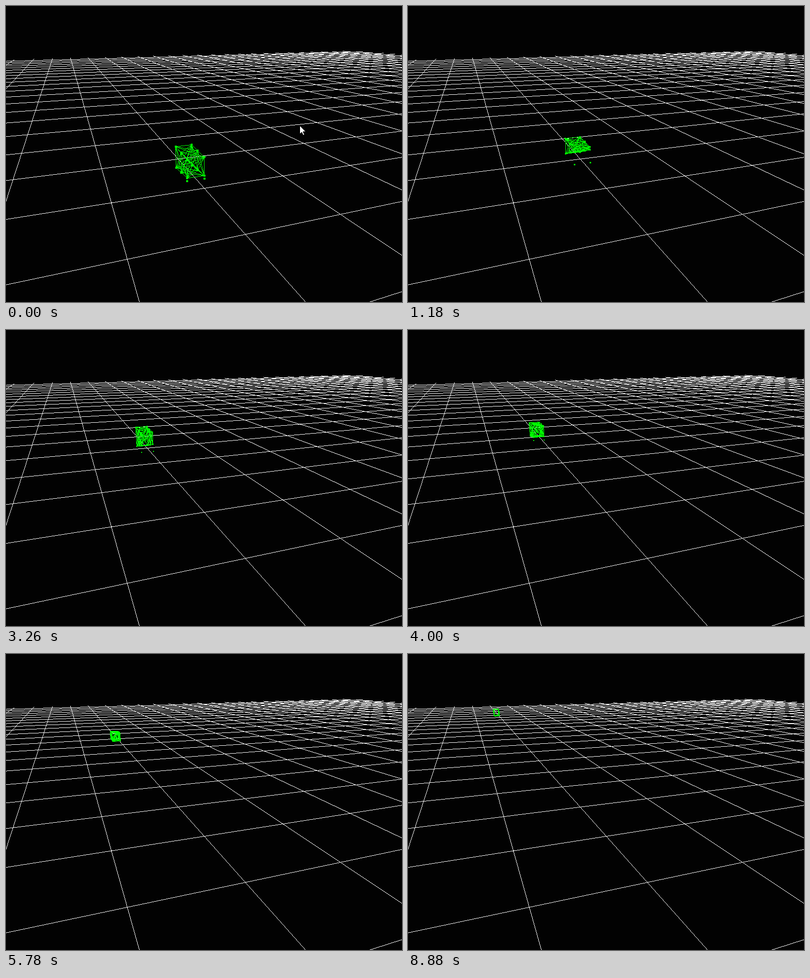
Animation, 800 px wide and 600 px high, one loop 8.9 s. Source, as an HTML page with a canvas:

```html
<!DOCTYPE html>
<html lang="en">
<head>
<meta charset="utf-8">
<title>Wire cube on a plane</title>
<style>
html, body { margin: 0; width: 100%; height: 100%; overflow: hidden; background: #020202; }
canvas { display: block; }
</style>
</head>
<body>
<canvas id="stage" width="800" height="600"></canvas>
<script>
const W = 800, H = 600, LOOP = 8900;
const ctx = document.getElementById('stage').getContext('2d');

// Camera: 45 degree lens above a plane with cells of size 1
const FOCAL = 300 / Math.tan(Math.PI / 8);
const EYE = 1.6622, NEAR = 0.2, EDGE = 22;
const pitch = Math.atan(254 / FOCAL), yaw = 20.47 * Math.PI / 180;
const sp = Math.sin(pitch), cp = Math.cos(pitch);
const sy = Math.sin(yaw), cy = Math.cos(yaw);

function toCamera(u, v, h) {
  const a = u - 0.7393, b = v + 1.3679;
  const right = cy * a - sy * b;
  const ahead = sy * a + cy * b;
  const drop = EYE - h;
  return [right, drop * cp - ahead * sp, ahead * cp + drop * sp];
}

// Whole numbers are pixel centres
function toScreen([x, y, z]) {
  return [399.5 + FOCAL * x / z, 299.5 + FOCAL * y / z];
}

const project = (u, v, h = 0) => toScreen(toCamera(u, v, h));

// One pixel wide line without smoothing
function line(g, p, q) {
  let [x0, y0] = p, [x1, y1] = q;
  const steep = Math.abs(y1 - y0) > Math.abs(x1 - x0);
  if (steep) [x0, y0, x1, y1] = [y0, x0, y1, x1];
  if (x0 > x1) [x0, y0, x1, y1] = [x1, y1, x0, y0];
  const slope = x1 > x0 ? (y1 - y0) / (x1 - x0) : 0;
  const end = Math.min(Math.round(x1), W);
  for (let x = Math.max(Math.round(x0), 0); x <= end; x++) {
    const y = Math.round(y0 + (x - x0) * slope);
    if (steep) g.fillRect(y, x, 1, 1);
    else g.fillRect(x, y, 1, 1);
  }
}

function groundLine(g, u0, v0, u1, v1) {
  let a = toCamera(u0, v0, 0), b = toCamera(u1, v1, 0);
  if (a[2] > b[2]) [a, b] = [b, a];
  if (b[2] <= NEAR) return;
  if (a[2] < NEAR) {
    const k = (NEAR - a[2]) / (b[2] - a[2]);
    a = a.map((c, i) => c + (b[i] - c) * k);
  }
  line(g, toScreen(a), toScreen(b));
}

function makeGrid() {
  const c = document.createElement('canvas');
  c.width = W;
  c.height = H;
  const g = c.getContext('2d');
  g.fillStyle = '#020202';
  g.fillRect(0, 0, W, H);
  g.fillStyle = '#fff';
  for (let i = -18; i < EDGE; i++) {
    groundLine(g, i, -18, i, EDGE);
    groundLine(g, -18, i, EDGE, i);
  }
  return c;
}

// time, heights: front bottom, front top, back bottom, back top
const poses = [
  [0, 0.04, 0.27, 0, 0.28],
  [1180, 0.18, 0.22, 0, 0.225],
  [2060, 0.21, 0.43, 0, 0.42],
  [3260, 0.13, 0.35, 0, 0.365],
  [4820, 0, 0.22, 0, 0.19],
  [6980, 0, 0.24, 0, 0.24],
  [8900, 0, 0.28, 0, 0.28]
];

function poseAt(t) {
  let i = 0;
  while (i < poses.length - 2 && t >= poses[i + 1][0]) i++;
  const a = poses[i], b = poses[i + 1];
  const k = (t - a[0]) / (b[0] - a[0]);
  return a.map((c, j) => c + (b[j] - c) * k);
}

const WIDE = 0.21, DEEP = 0.46;
const nodes = [];
for (const a of [0, 1])
  for (const b of [0, 0.5, 1])
    for (const c of [0, 1]) nodes.push([a, b, c]);

function dot([x, y], size) {
  const shift = (size - 1) / 2;
  ctx.fillRect(Math.round(x - shift), Math.round(y - shift), size, size);
}

function drawBody(t) {
  const [, fb, ft, bb, bt] = poseAt(t);
  const v = 2.245 + 0.00033 * t + 1.325e-7 * t * t;
  const u = 1.8 + 0.084 * Math.exp((2.245 - v) / 4);
  const size = Math.max(1, Math.round(15 / (v + 1.9)));
  const pts = nodes.map(([a, b, c]) => {
    const low = fb + (bb - fb) * b, high = ft + (bt - ft) * b;
    return project(u + WIDE * a, v + DEEP * b, low + (high - low) * c);
  });

  ctx.fillStyle = '#0f0';
  for (let i = 0; i < pts.length; i++) {
    for (let j = 0; j < i; j++) {
      const apart = nodes[i].filter((c, k) => c !== nodes[j][k]).length;
      if (v < 15 || apart === 1) line(ctx, pts[i], pts[j]);
    }
    dot(pts[i], size);
  }
  dot(project(u, v), size);
  dot(project(u + WIDE, v), size);
}

const arrow = new Path2D('M0 0V17L4 13.3L6.8 19.5L9.4 18.4L6.7 12.3H12Z');

function drawPointer(t) {
  const k = t / 1060;
  if (k >= 1) return;
  ctx.save();
  ctx.translate(593.5 + 210 * k * k, 242.5 - 235 * k * k);
  ctx.fillStyle = '#fff';
  ctx.strokeStyle = '#000';
  ctx.fill(arrow);
  ctx.stroke(arrow);
  ctx.restore();
}

const grid = makeGrid();
const start = performance.now();

function frame() {
  const t = (performance.now() - start) % LOOP;
  ctx.drawImage(grid, 0, 0);
  drawBody(t);
  drawPointer(t);
  requestAnimationFrame(frame);
}
frame();
</script>
</body>
</html>
```
